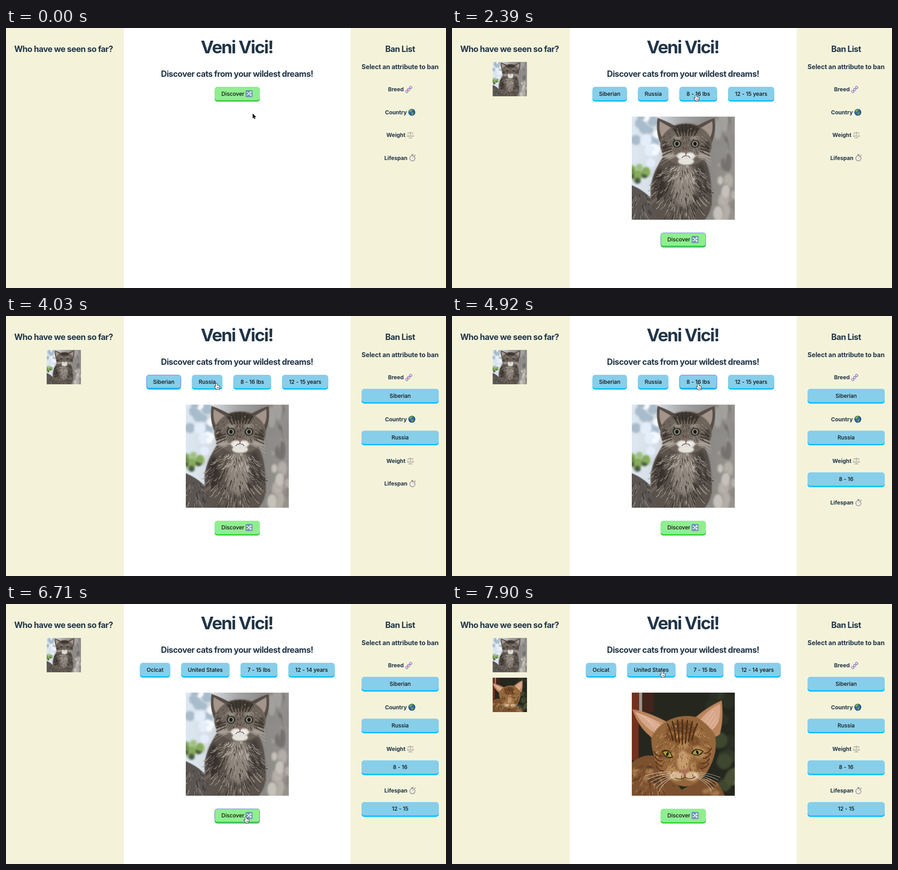
Animation, 974 px wide and 575 px high, one loop 8000 ms. Source, as an HTML page with a canvas:

```html
<!DOCTYPE html>
<html lang="en">
<head>
<meta charset="utf-8">
<title>Veni Vici!</title>
<style>
html, body { margin: 0; width: 100%; height: 100%; overflow: hidden; background: #fff; }
canvas { display: block; width: 974px; height: 575px; }
</style>
</head>
<body>
<canvas id="stage"></canvas>
<script>
const W = 974, H = 575, LOOP = 8000, STEP = 147;
const MID = 512, LEFT = 127.4, RIGHT = 872.4;
const PHOTO = 228, THUMB = 76, BOX_H = 29.7, PAD = 15;
const INK = '#213547', FOCUS = '#646cff';
const GREEN = ['#90ee90', '#32cd32'], BLUE = ['#87ceeb', '#00bfff'];
const canvas = document.getElementById('stage');
const dpr = window.devicePixelRatio || 1;
canvas.width = W * dpr;
canvas.height = H * dpr;
const ctx = canvas.getContext('2d');

// size, weight, tracking in px
const FONT = {
  title: [38.9, 700, -2],
  h2: [18.24, 700, -0.57],
  h3: [14.2, 700, -0.11],
  label: [12.16, 700, -0.04],
  button: [12.16, 500, -0.06]
};

// Draws a line of text and returns its width
function text(str, x, y, style, align = 'center', color = INK) {
  const [size, weight, track] = FONT[style];
  ctx.font = `${weight} ${size}px Inter, "Open Sans", sans-serif`;
  ctx.letterSpacing = track + 'px';
  ctx.textAlign = align;
  ctx.fillStyle = color;
  const width = ctx.measureText(str).width;
  ctx.fillText(str, align === 'icon' ? x - width / 2 : x, y);
  return width;
}

function fill(g, color, path) {
  g.fillStyle = color;
  g.fill(new Path2D(path));
}

function line(g, color, width, path) {
  g.strokeStyle = color;
  g.lineWidth = width;
  g.lineCap = g.lineJoin = 'round';
  g.stroke(new Path2D(path));
}

function oval(g, color, x, y, rx, ry = rx) {
  g.fillStyle = color;
  g.beginPath();
  g.ellipse(x, y, rx, ry, 0, 0, 7);
  g.fill();
}

function soft(g, px, paint) {
  g.filter = `blur(${px}px)`;
  paint();
  g.filter = 'none';
}

function at(g, x, y, paint, flip = 1) {
  g.save();
  g.translate(x, y);
  g.scale(flip, 1);
  paint(g);
  g.restore();
}

function mirror(g, x, y, paint) {
  at(g, x, y, paint);
  at(g, x, y, paint, -1);
}

function random(seed) {
  return () => (seed = seed * 16807 % 2147483647) / 2147483647;
}

// Calls paint for n seeded places inside an ellipse
function scatter(rnd, n, x, y, rx, ry, colors, paint) {
  for (let i = 0; i < n; i++) {
    const a = rnd() * 2 * Math.PI, r = Math.sqrt(rnd());
    const dx = Math.cos(a) * r, dy = Math.sin(a) * r;
    paint(x + dx * rx, y + dy * ry, colors[Math.floor(rnd() * colors.length)], dx, dy);
  }
}

function spots(g, rnd, n, x, y, rx, ry, colors, w, h = w) {
  soft(g, 4, () => scatter(rnd, n, x, y, rx, ry, colors, (px, py, c) => {
    const k = 0.6 + rnd() * 0.7;
    oval(g, c, px, py, w * k, h * k);
  }));
}

// Soft hairs that fan out from the middle
function fur(g, rnd, n, x, y, rx, ry, colors, len) {
  soft(g, 0.7, () => scatter(rnd, n, x, y, rx, ry, colors, (px, py, c, dx, dy) => {
    const l = len * (0.5 + rnd());
    line(g, c, 0.8 + rnd(), `M${px} ${py}q${dx * l * 0.3} ${l * 0.5} ${dx * l} ${l * (0.7 + dy * 0.3)}`);
  }));
}

function photo(paint) {
  const c = document.createElement('canvas');
  c.width = c.height = PHOTO * 2;
  const g = c.getContext('2d');
  g.scale(2, 2);
  paint(g, random(41));
  return c;
}

const kitten = photo((g, rnd) => {
  const back = g.createLinearGradient(0, 0, PHOTO, 0);
  ['#dde8f2', '#d5dde4', '#a5a6a6', '#8b8986', '#97948f'].forEach((c, i) => back.addColorStop(i / 4, c));
  g.fillStyle = back;
  g.fillRect(0, 0, PHOTO, PHOTO);
  spots(g, rnd, 16, 28, 55, 34, 55, ['#f6faff', '#e4eefa', '#a9bccb'], 10);
  spots(g, rnd, 14, 18, 128, 24, 22, ['#86ad5c', '#6b8a4b', '#9fbf80', '#4c5a40'], 8);
  spots(g, rnd, 22, 202, 55, 22, 55, ['#8f8d8b', '#757270', '#a3a19e'], 7, 18);
  spots(g, rnd, 18, 202, 178, 25, 42, ['#c6c2bb', '#b3aea6', '#8d8882'], 9, 14);
  soft(g, 1.5, () => fill(g, '#5b5552', 'M-4 150Q32 164 50 190L84 232H-4Z'));
  fur(g, rnd, 40, 20, 196, 26, 26, ['#86807b', '#38332f'], 14);

  soft(g, 2, () => fill(g, '#5a524b', 'M74 82Q48 118 42 154Q38 195 62 230H160Q182 205 176 165Q176 118 158 88Z'));
  soft(g, 8, () => {
    oval(g, '#37322e', 62, 152, 13, 38);
    oval(g, '#423b36', 152, 140, 12, 36);
    oval(g, '#8f867d', 116, 150, 26, 48);
  });
  fur(g, rnd, 330, 110, 162, 62, 60, ['#857c73', '#38322d', '#9f968c', '#5f5750'], 12);
  fur(g, rnd, 60, 118, 124, 34, 20, ['#bfb6ac', '#8b8279'], 12);

  mirror(g, 120, 0, () => {
    soft(g, 0.8, () => {
      fill(g, '#574e47', 'M63 3Q68 34 56 60L18 24Q42 10 63 3Z');
      fill(g, '#a4958b', 'M58 10Q61 32 53 46L31 26Z');
    });
  });
  soft(g, 1.5, () => oval(g, '#6d645b', 120, 62, 57, 46));
  soft(g, 4, () => {
    oval(g, '#403832', 120, 26, 30, 10);
    mirror(g, 120, 0, () => {
      oval(g, '#9a8f84', 20, 47, 10, 5);
      oval(g, '#a0968b', 39, 84, 13, 9);
      oval(g, '#453d36', 47, 64, 6, 12);
    });
  });
  fur(g, rnd, 150, 120, 54, 52, 36, ['#463d36', '#93897e', '#7d7268'], 5);
  soft(g, 0.8, () => {
    for (let i = -3; i <= 3; i++) line(g, '#332c27', 2.4, `M${120 + i * 9} ${17 + i * i}L${120 + i * 6} 42`);
  });
  mirror(g, 120, 0, () => {
    soft(g, 0.8, () => {
      for (let i = 0; i < 3; i++) line(g, '#352e29', 2, `M32 ${65 + i * 6}L52 ${70 + i * 8}`);
    });
    soft(g, 3, () => {
      oval(g, '#ece8e3', 9, 87, 11, 8);
      oval(g, '#e6e2dc', 0, 99, 17, 7);
    });
    soft(g, 0.5, () => {
      oval(g, '#2b2622', 20, 60, 9.5, 8.5);
      oval(g, '#85867c', 20, 60, 7, 6.8);
      oval(g, '#171715', 20, 60, 3.6, 4.4);
    });
    line(g, '#4a403a', 1.3, 'M0 80V87Q5 86 9 91');
    for (let i = 0; i < 3; i++) line(g, '#dedad4', 0.5, `M14 86Q36 ${83 + i * 4} 56 ${92 + i * 8}`);
  });
  fill(g, '#93665a', 'M114.5 75.5Q120 73 125.5 75.5L120 81Z');
});

const ocicat = photo((g, rnd) => {
  fill(g, '#25271f', 'M0 0H228V228H0Z');
  soft(g, 1, () => {
    fill(g, '#74301f', 'M-4-4H15V150H-4Z');
    fill(g, '#a09486', 'M16-4H23V60H16Z');
    fill(g, '#43241b', 'M25-4H48V44H25Z');
  });
  spots(g, rnd, 14, 190, 110, 40, 110, ['#333a29', '#40472f', '#2c3024'], 14);
  spots(g, rnd, 5, 220, 185, 8, 30, ['#5a6140', '#4a5035'], 10);

  soft(g, 1, () => fill(g, '#7b5130', 'M-4 158Q28 130 61 143L110 215L152 192Q190 182 207 232H-4Z'));
  spots(g, rnd, 18, 42, 190, 45, 32, ['#a87b4e', '#4a3019', '#8d6038'], 7, 5);
  spots(g, rnd, 8, 175, 212, 22, 12, ['#a87b4e', '#563719'], 7, 5);
  fur(g, rnd, 100, 45, 190, 52, 34, ['#56371f', '#b08358', '#79522f'], 7);

  soft(g, 0.8, () => {
    fill(g, '#b9845a', 'M1 37Q35 41 84 68L65 98Q50 109 39 95Q15 76 1 37ZM135 60Q164 33 199 17Q204 58 195 92Q180 105 157 92Z');
    fill(g, '#d8a68b', 'M7 43Q39 51 72 76L57 91Q29 81 7 43ZM146 66Q170 36 195 25Q199 58 184 77Q171 87 153 80Z');
    for (let i = 0; i < 4; i++) {
      line(g, '#ecd3bc', 0.9, `M${12 + i * 8} ${46 + i * 5}L${76 - i * 6} ${72 + i * 5}`);
      line(g, '#ecd3bc', 0.9, `M${150 + i * 8} ${82 + i * 2}L${180 + i * 4} ${40 + i * 7}`);
    }
    fill(g, '#94663b', 'M74 65Q106 46 143 54Q170 70 184 93Q191 128 175 160Q162 190 137 203Q114 213 94 200Q66 186 55 157Q43 129 43 100Q55 76 74 65Z');
  });
  spots(g, rnd, 26, 113, 128, 58, 66, ['#b48655', '#a5764a', '#7c4f2a'], 9);
  soft(g, 4, () => {
    oval(g, '#c79c6c', 113, 152, 13, 24);
    oval(g, '#71482a', 112, 78, 26, 14);
    mirror(g, 116, 0, () => oval(g, '#d8ba92', 16, 184, 15, 10));
  });
  fur(g, rnd, 260, 112, 122, 62, 64, ['#76492a', '#bd9261', '#a27245'], 5);
  soft(g, 0.9, () => {
    for (let i = -3; i <= 3; i++) {
      line(g, '#46290f', 2.8, `M${112 + i * 11} ${60 + i * i}Q${112 + i * 8} 90 ${112 + i * 7} ${114 - Math.abs(i) * 3}`);
    }
    for (let i = 0; i < 4; i++) {
      line(g, '#523119', 2.3, `M${64 + i * 2} ${140 + i * 11}q-10 1-15-10`);
      line(g, '#523119', 2.3, `M${160 - i * 2} ${134 + i * 11}q11 1 16-11`);
    }
  });
  for (const [x, y, tilt] of [[79, 136, 0.35], [145, 132, -0.35]]) {
    at(g, x, y, () => {
      g.rotate(tilt);
      soft(g, 0.6, () => fill(g, '#2e2014', 'M-14-2Q0-16 14 3Q0 14-14-2Z'));
      fill(g, '#a69843', 'M-11-1Q0-12 11 2Q0 10-11-1Z');
      oval(g, '#15140d', 0, 0, 2.4, 4.6);
    });
  }
  soft(g, 0.6, () => {
    fill(g, '#ae705a', 'M105 173Q117 166 129 172L118 181Z');
    line(g, '#573521', 1.5, 'M96 189Q110 194 118 187Q130 194 141 186M118 181V187');
  });
  for (let i = 0; i < 6; i++) {
    line(g, '#f3e9db', 0.8, `M${96 - i} ${177 + i * 2}Q66 ${172 + i * 6} ${30 + i * 6} ${184 + i * 7}`);
    line(g, '#f3e9db', 0.7, `M${137 + i} ${177 + i * 2}Q169 ${176 + i * 5} ${196 - i * 4} ${188 + i * 6}`);
  }
});

const icons = {
  dna(g) {
    g.rotate(0.75);
    const strand = s => {
      let d = '';
      for (let y = -9; y <= 9; y += 0.5) d += `${d ? 'L' : 'M'}${s * 2.8 * Math.cos(y * 0.48)} ${y}`;
      return d;
    };
    for (let y = -8; y <= 8; y += 2) {
      const w = 2.8 * Math.cos(y * 0.48);
      line(g, y % 4 ? '#8cc4ea' : '#c79ade', 0.8, `M${-w} ${y}H${w}`);
    }
    line(g, '#5f7fd6', 1.3, strand(-1));
    line(g, '#d85ab0', 1.3, strand(1));
  },
  globe(g) {
    oval(g, '#1f4680', 0, 0, 7.7);
    oval(g, '#2f69ad', -0.7, -0.7, 6.3);
    fill(g, '#6b9a50', 'M-6-4Q-3-8 2-7L3-5L0-4L-1-1L-3 0L-5-2ZM-1 0Q4 0 5 2L2 6L0 7L-1 3Z');
    oval(g, '#b9b077', -2.5, -3.5, 1.6, 1);
  },
  scales(g) {
    line(g, '#96968f', 1.1, 'M0-7V6M-6-5H6M-4 6.5H4');
    mirror(g, 0, 0, () => {
      line(g, '#b2b2ab', 0.6, 'M5-5L2.5 2H7Z');
      line(g, '#898982', 1.2, 'M2.5 2.5H7');
    });
  },
  watch(g) {
    line(g, '#8a8983', 1.8, 'M0-7V-5M-1.5-7H1.5M5-5L6-6');
    oval(g, '#8d8c86', 0, 1, 6.5);
    oval(g, '#f4f3ee', 0, 1, 5);
    line(g, '#d5733d', 0.8, 'M0 1L3-2');
  },
  shuffle(g) {
    g.fillStyle = '#6d92b7';
    g.beginPath();
    g.roundRect(-7.7, -7.7, 15.4, 15.4, 2.5);
    g.fill();
    line(g, '#f7fbff', 1.4, 'M-5.5-3H-3L2 3H5M-5.5 3H-3L2-3H5M3.2-5L5.3-3L3.2-1M3.2 1L5.3 3L3.2 5');
  }
};

function box(x, y, w, [face, base], focus) {
  for (const [dy, color] of [[3, base], [0, face]]) {
    ctx.fillStyle = color;
    ctx.beginPath();
    ctx.roundRect(x, y + dy, w, BOX_H, 6);
    ctx.fill();
  }
  if (!focus) return;
  ctx.strokeStyle = FOCUS;
  ctx.lineWidth = 0.85;
  ctx.beginPath();
  ctx.roundRect(x + 0.4, y + 0.4, w - 0.8, BOX_H - 0.8, 5.6);
  ctx.stroke();
}

function button(label, x, y, w, focus) {
  box(x, y, w, BLUE, focus);
  text(label, x + w / 2, y + 19.4, 'button', 'center', '#111');
}

// Buttons with their widths; each row is centred with even gaps
function layout(items) {
  const gap = 24.3;
  const total = items.reduce((sum, [, w]) => sum + w, gap * (items.length - 1));
  let x = MID - total / 2;
  return items.map(([label, w]) => {
    const b = { label, x, w };
    x += w + gap;
    return b;
  });
}
const FIRST = layout([['Siberian', 76.5], ['Russia', 67.5], ['8 - 16 lbs', 83.5], ['12 - 15 years', 102]]);
const SECOND = layout([['Ocicat', 67], ['United States', 107], ['7 - 15 lbs', 82], ['12 - 14 years', 102.3]]);

// label, icon, banned value, time of the ban
const BANS = [
  ['Breed', 'dna', 'Siberian', 3440],
  ['Country', 'globe', 'Russia', 4020],
  ['Weight', 'scales', '8 - 16', 4780],
  ['Lifespan', 'watch', '12 - 15', 5520]
];

const SHOWN = 2390, NEXT = 6710, SWAPPED = 7010;

// Which button has the focus from each time on
const FOCUSES = [
  [0, null], [1190, 'Discover'], [3290, 'Siberian'], [4180, 'Russia'], [4330, null],
  [4630, '8 - 16 lbs'], [5380, '12 - 15 years'], [5970, null], [6260, 'Discover'], [7610, null]
];

// start, steps, pointer tip after the last step
const MOVES = [
  [150, 5, 531, 148],
  [1190, 2, 528, 148],
  [1790, 1, 540, 148],
  [2840, 4, 345, 149],
  [3730, 3, 466, 149],
  [4180, 2, 545, 150],
  [5080, 3, 652, 156],
  [5820, 4, 531, 471],
  [7310, 5, 465, 149]
];

function pointer(t) {
  let x = 546, y = 189;
  for (const [start, steps, tx, ty] of MOVES) {
    if (t < start) break;
    const p = Math.min(1, (Math.floor((t - start) / STEP) + 1) / steps);
    const k = p * p * (3 - 2 * p);
    x += (tx - x) * k;
    y += (ty - y) * k;
  }
  return [x, y];
}

const HAND = 'M-1.4 1.2Q0-1 1.4 1.2V4.8Q2.6 4 3.5 5.2Q4.7 4.6 5.3 5.8Q7 5.5 7 7.5Q7 10 5.8 11.3V13H-.4V11.7Q-2.6 10-4 7.8Q-4 6.2-2.5 6.8L-1.4 8Z';
const ARROW = 'M0 0V11L2.5 8.7L4.2 12.6L6 11.8L4.4 8.1H7.8Z';

function drawPointer(x, y, hand) {
  at(ctx, x, y, g => {
    line(g, hand ? '#111' : '#fff', 1.6, hand ? HAND : ARROW);
    fill(g, hand ? '#fff' : '#000', hand ? HAND : ARROW);
    if (hand) line(g, '#111', 0.7, 'M1.5 8.5V11M3.3 8.5V11M5 8.5V11');
  });
}

function drawBans(t) {
  let y = 136;
  for (const [label, icon, value, when] of BANS) {
    const space = 18.7;
    const w = text(label, RIGHT - space / 2, y + 4.4, 'label');
    at(ctx, RIGHT + w / 2 + 1.8, y, icons[icon]);
    if (t >= when) {
      button(value, 787, y + 25.1, 171);
      y += 41.9;
    }
    y += 50.4;
  }
}

function draw(t) {
  ctx.setTransform(dpr, 0, 0, dpr, 0, 0);
  ctx.imageSmoothingQuality = 'high';
  ctx.fillStyle = '#fff';
  ctx.fillRect(0, 0, W, H);
  ctx.fillStyle = '#f4f3da';
  ctx.fillRect(0, 0, 261, H);
  ctx.fillRect(763, 0, 211, H);

  text('Who have we seen so far?', LEFT, 53.2, 'h2');
  text('Veni Vici!', MID - 1, 55.7, 'title');
  text('Discover cats from your wildest dreams!', MID - 0.5, 108.2, 'h2');
  text('Ban List', RIGHT, 53.2, 'h2');
  text('Select an attribute to ban', RIGHT, 91.2, 'h3');
  drawBans(t);

  const focus = FOCUSES.filter(([start]) => t >= start).pop()[1];
  const loaded = t >= SHOWN, top = 130.1;
  const row = !loaded ? [] : t < NEXT ? FIRST : SECOND;
  for (const { label, x, w } of row) button(label, x, top, w, focus === label);

  if (loaded) {
    const seen = t < SWAPPED ? [kitten] : [kitten, ocicat];
    ctx.drawImage(seen[seen.length - 1], 398, 196, PHOTO, PHOTO);
    seen.forEach((cat, i) => ctx.drawImage(cat, 89.5, 75 + i * 88, THUMB, THUMB));
  }

  const main = { x: 461.8, y: loaded ? 452.7 : top, w: 100.2 };
  box(main.x, main.y, main.w, GREEN, focus === 'Discover');
  text('Discover', main.x + PAD, main.y + 19.4, 'button', 'left', '#111');
  at(ctx, main.x + 76.2, main.y + 15, icons.shuffle);

  const [px, py] = pointer(t);
  const over = ({ x, y = top, w }) => px >= x && px <= x + w && py >= y && py <= y + BOX_H;
  drawPointer(px, py, [main, ...row].some(over));
}

const begin = performance.now();
function tick() {
  draw((performance.now() - begin) % LOOP);
  requestAnimationFrame(tick);
}
tick();
</script>
</body>
</html>
```
